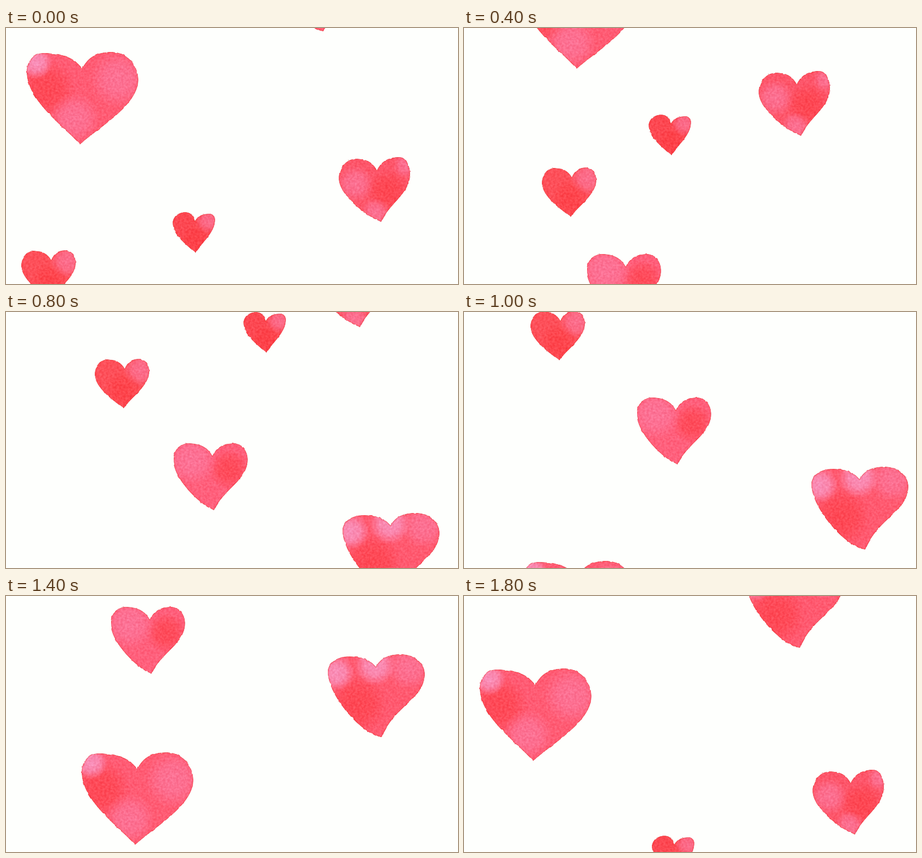
Recreate the animation shown at these times as an HTML page. Size 830 px wide and 470 px high, loop 2 s.

```html
<!DOCTYPE html>
<html lang="en">
<head>
<meta charset="utf-8">
<title>Floating hearts</title>
<style>
html, body { margin: 0; width: 100%; height: 100%; overflow: hidden; background: #fefffd; }
svg { display: block; width: 830px; height: 470px; }
</style>
</head>
<body>
<svg id="stage" viewBox="0 0 830 470" xmlns="http://www.w3.org/2000/svg">
  <defs id="defs">
    <filter id="paint" color-interpolation-filters="sRGB">
      <feTurbulence type="fractalNoise" baseFrequency=".1" numOctaves="2" seed="4" result="wave"/>
      <feDisplacementMap in="SourceGraphic" in2="wave" scale="3" xChannelSelector="R" yChannelSelector="G" result="rough"/>
      <feTurbulence type="fractalNoise" baseFrequency=".25" numOctaves="3" seed="9"/>
      <feColorMatrix values="0 .3 0 0 .35  0 1 0 0 0  0 1 0 0 0  0 0 0 0 1" result="grain"/>
      <feComposite in="rough" in2="grain" operator="arithmetic" k2="1" k3=".2" k4="-.1"/>
      <feComposite in2="rough" operator="in"/>
    </filter>
  </defs>
</svg>
<script>
const STEP = 200, STEPS = 10;
const WASHES = { red: ['#fd3c42', .62], pink: ['#fb7aa0', .75], pale: ['#f896c2', .9] };

// Shapes are measured from the tip at 0,0.
// left, right: top of the lobe, then its outermost point; lean: how far the tip bends right
// washes: colour, x, y, radius; keys: step, tip x, tip y
const hearts = [
  {
    fill: '#ff5c74', lean: 0, notch: [4, -140],
    left: [[-68, -168], [-98, -134]], right: [[58, -170], [107, -119]],
    washes: [['red', -62, -102, 54], ['pale', -80, -150, 30], ['pink', -10, -48, 46], ['pink', 70, -120, 52]],
    keys: [[5, 204, 627], [7, 237, 457], [8, 184, 372], [9, 127, 303], [10, 136, 214], [11, 184, 145], [13, 226, 5]]
  },
  {
    fill: '#fd505a', lean: .05, notch: [2, -73],
    left: [[-31, -90], [-53, -62]], right: [[29, -91], [47, -68]],
    washes: [['pink', 32, -71, 32], ['red', -2, -32, 36]],
    keys: [[0, 81, 499], [1, 136, 428], [3, 236, 263], [5, 175, 89]]
  },
  {
    fill: '#fc4852', lean: .05, notch: [-1, -59],
    left: [[-19, -75], [-42, -55]], right: [[26, -72], [36, -61]],
    washes: [['pink', 24, -59, 24], ['red', -2, -25, 26]],
    keys: [[9, 387, 515], [10, 348, 413], [11, 329, 310], [13, 442, 161], [14, 478, 75]]
  },
  {
    fill: '#fd566a', lean: .15, notch: [-8, -95],
    left: [[-46, -116], [-78, -80]], right: [[34, -119], [53, -87]],
    washes: [['red', 12, -56, 40], ['pink', -48, -70, 34], ['pink', -10, -18, 26], ['pink', 46, -104, 24]],
    keys: [[8, 684, 521], [9, 718, 438], [10, 689, 356], [11, 640, 282], [13, 613, 112], [14, 650, 28]]
  },
  {
    fill: '#ff5a70', lean: .25, notch: [-11, -129],
    left: [[-62, -148], [-99, -120]], right: [[35, -152], [79, -116]],
    washes: [['red', -45, -60, 55], ['pale', -84, -118, 34], ['pale', -12, -132, 38], ['pink', 50, -128, 42]],
    keys: [[3, 693, 605], [5, 737, 436], [6, 737, 348], [7, 690, 259], [8, 651, 182], [10, 583, 6]]
  },
  {
    fill: '#ff607c', lean: .17, notch: [-3, -100],
    left: [[-48, -123], [-75, -93]], right: [[37, -123], [62, -93]],
    washes: [['red', 28, -75, 38], ['pink', -40, -92, 46]],
    keys: [[2, 300, 538], [3, 346, 452], [5, 392, 280], [7, 267, 143], [8, 222, 57]]
  }
];

const stage = document.getElementById('stage');
const defs = document.getElementById('defs');

function add(parent, tag, attrs = {}) {
  const el = document.createElementNS('http://www.w3.org/2000/svg', tag);
  for (const key in attrs) el.setAttribute(key, attrs[key]);
  return parent.appendChild(el);
}

const mix = (a, b, u) => a + (b - a) * u;

// Half a heart as three curves: notch, lobe top, side, tip.
function half([nx, ny], [[tx, ty], [sx, sy]], bend) {
  return [
    [nx, ny],
    [mix(nx, tx, .2), mix(ny, ty, .7)], [mix(tx, nx, .5), ty], [tx, ty],
    [mix(tx, sx, .55), ty], [sx, mix(sy, ty, .55)], [sx, sy],
    [sx, sy * .6], [sx * .3, sy * (.25 + bend)], [0, 0]
  ];
}

function outline(h) {
  const down = half(h.notch, h.left, -h.lean);
  const up = half(h.notch, h.right, h.lean).reverse();
  return `M${down[0]}C${down.slice(1).join(' ')} ${up.slice(1).join(' ')}Z`;
}

for (const [name, [color, strength]] of Object.entries(WASHES)) {
  const grad = add(defs, 'radialGradient', { id: name });
  for (const [offset, k] of [[0, 1], [.5, .8], [1, 0]])
    add(grad, 'stop', { offset, 'stop-color': color, 'stop-opacity': strength * k });
}

hearts.forEach((h, n) => {
  const d = outline(h);
  add(add(defs, 'clipPath', { id: 'clip' + n }), 'path', { d });
  h.el = add(stage, 'g');
  const body = add(add(h.el, 'g', { filter: 'url(#paint)' }), 'g', { 'clip-path': `url(#clip${n})` });
  add(body, 'path', { d, fill: h.fill });
  for (const [name, cx, cy, r] of h.washes) add(body, 'circle', { cx, cy, r, fill: `url(#${name})` });
  add(body, 'path', { d, fill: 'none', stroke: '#fb4444', 'stroke-width': 3, 'stroke-opacity': .45 });
});

// Smooth path through the keys; null when the heart is out of view.
function place(keys, step) {
  const last = keys.length - 1;
  if (step < keys[0][0]) step += STEPS;
  if (step > keys[last][0]) return null;
  const i = Math.max(0, keys.findIndex(k => k[0] >= step) - 1);
  const a = keys[i], b = keys[i + 1], span = b[0] - a[0], u = (step - a[0]) / span;
  const slope = (j, c) => {
    const p = keys[Math.max(j - 1, 0)], q = keys[Math.min(j + 1, last)];
    return (q[c] - p[c]) / (q[0] - p[0]) * span;
  };
  return [1, 2].map(c => mix(a[c], b[c], u * u * (3 - 2 * u))
    + u * (1 - u) * ((1 - u) * slope(i, c) - u * slope(i + 1, c)));
}

let shown = -1;
function draw(ms) {
  const step = Math.floor(ms / STEP) % STEPS;
  if (step === shown) return;
  shown = step;
  for (const h of hearts) {
    const at = place(h.keys, step);
    h.el.setAttribute('display', at ? 'inline' : 'none');
    if (at) h.el.setAttribute('transform', `translate(${at.map(Math.round)})`);
  }
}

const start = performance.now();
function tick() {
  draw(performance.now() - start);
  requestAnimationFrame(tick);
}
tick();
</script>
</body>
</html>
```
